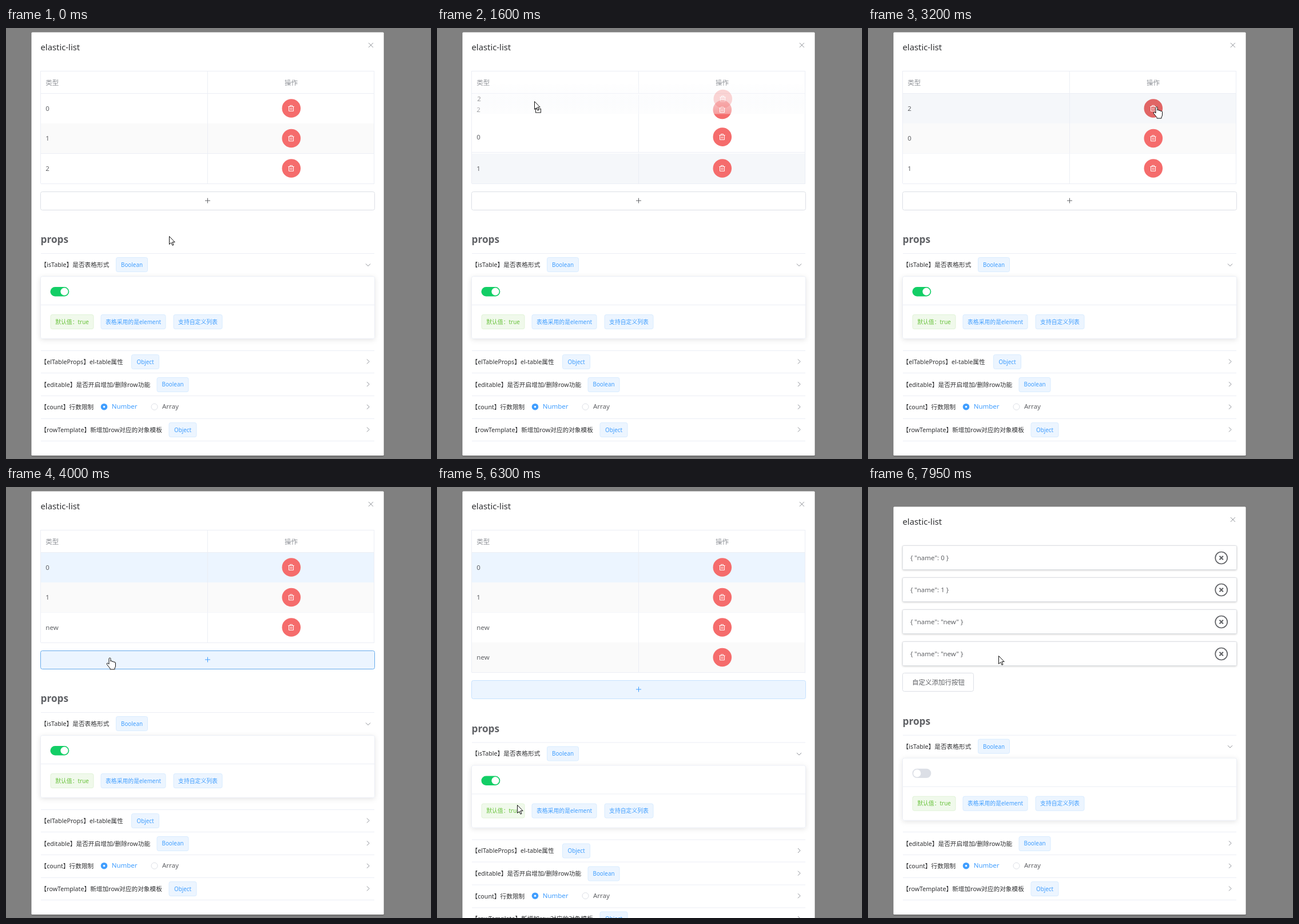
Recreate the animation shown at these times as an HTML page. Size 743x754 px, loop 8 s.

```html
<!DOCTYPE html>
<html lang="zh-CN">
<head>
<meta charset="utf-8">
<title>elastic-list</title>
<style>
html, body { margin: 0; width: 100%; height: 100%; overflow: hidden; background: #808080; }
svg { display: block; width: 743px; height: 754px; }
text { font-family: "Noto Sans", "Noto Sans CJK SC", "Noto Sans CJK", "Noto Sans CJK JP", sans-serif; white-space: pre; }
</style>
</head>
<body>
<svg viewBox="0 0 743 754">
  <defs>
    <filter id="dialogShadow" x="-5%" y="-5%" width="110%" height="110%">
      <feDropShadow dx="0" dy="1" stdDeviation="1.2" flood-opacity=".3"/>
    </filter>
    <filter id="cardShadow" x="-5%" y="-20%" width="110%" height="150%">
      <feDropShadow dx="0" dy="2" stdDeviation="4" flood-opacity=".1"/>
    </filter>
    <filter id="itemShadow" x="-5%" y="-20%" width="110%" height="150%">
      <feDropShadow dx="0" dy="1" stdDeviation="1.5" flood-opacity=".18"/>
    </filter>
    <linearGradient id="ghostFade" x1="0" y1="0" x2="0" y2="1">
      <stop offset="0" stop-color="#f9fafc" stop-opacity=".1"/>
      <stop offset=".6" stop-color="#f9fafc" stop-opacity=".6"/>
      <stop offset="1" stop-color="#f9fafc" stop-opacity=".35"/>
    </linearGradient>
  </defs>
  <g id="scene"></g>
</svg>
<script>
const LOOP = 8000, LEFT = 61, RIGHT = 644, COL = 353, ROW = 52.5, HEAD = 39.5;
const BLUE = '#409eff', LINE = '#ebeef5', TEXT = '#606266', HOVER = '#f5f7fa', PALE = '#ecf5ff';
const SWAP1 = 890, SWAP2 = 1488, SWAP_MS = 150;
const DRAG = 720, DROP = 1690, REMOVE = 3350, ADD1 = 3950, ADD2 = 4650, TOGGLE = 6800;
const GRAB = { x: 169, y: 249.5 };
const scene = document.getElementById('scene');

// time, x, y
const PATH = [
  [50, 285, 364], [650, 169, 250], [720, 169, 250], [850, 131, 204], [900, 130, 191],
  [950, 130, 183], [1450, 166, 143], [1600, 170, 128], [1850, 170, 128], [2950, 505, 138],
  [3450, 505, 138], [3900, 182, 299], [4050, 182, 299], [4250, 157, 304], [4400, 133, 317],
  [5350, 133, 317], [6150, 235, 479], [6300, 140, 556], [6600, 91, 506], [6850, 91, 506],
  [7300, 124, 447], [7450, 124, 447], [7950, 228, 295]
];

const clamp = v => Math.max(0, Math.min(1, v));
const mix = (a, b, p) => a + (b - a) * p;
const easeOut = v => 1 - Math.pow(1 - clamp(v), 2.2);
const between = (v, a, b) => v >= a && v < b;

function cursorAt(t) {
  const i = PATH.findIndex(k => k[0] > t);
  if (i === 0) return { x: PATH[0][1], y: PATH[0][2] };
  if (i < 0) return { x: PATH.at(-1)[1], y: PATH.at(-1)[2] };
  const a = PATH[i - 1], b = PATH[i], p = (t - a[0]) / (b[0] - a[0]);
  return { x: mix(a[1], b[1], p), y: mix(a[2], b[2], p) };
}

const rect = (x, y, w, h, fill, more = '') =>
  `<rect x="${x}" y="${y}" width="${w}" height="${h}" fill="${fill}" ${more}/>`;
const box = (x, y, w, h, fill, stroke, more = '') =>
  rect(x + .5, Math.round(y) + .5, w - 1, h - 1, fill, `stroke="${stroke}" ${more}`);
const circle = (x, y, r, fill, more = '') => `<circle cx="${x}" cy="${y}" r="${r}" fill="${fill}" ${more}/>`;
const hline = (y, x = LEFT, x2 = RIGHT) => rect(x, Math.floor(y), x2 - x, 1, LINE);
const vline = (x, y, h) => rect(x, y, 1, h, LINE);
const stroke = (d, color, w = 1) => `<path d="${d}" fill="none" stroke="${color}" stroke-width="${w}"/>`;
const at = (x, y, body, more = '') => `<g transform="translate(${x} ${y})" ${more}>${body}</g>`;
const text = (x, cy, s, size, fill = TEXT, more = '') =>
  `<text x="${x}" y="${cy + size * .36}" font-size="${size}" fill="${fill}" ${more}>${s}</text>`;
const middle = 'text-anchor="middle"';

function tag(x, cy, w, s, green) {
  const [bg, edge, ink] = green ? ['#f0f9eb', '#e1f3d8', '#67c23a'] : [PALE, '#d9ecff', BLUE];
  return box(x, cy - 13, w, 26, bg, edge, 'rx="3"') + text(x + w / 2, cy, s, 9.85, ink, middle);
}

function trash(y, fill = '#f56c6c') {
  return circle(498.8, y, 16.3, fill) + at(498.5, y, stroke(
    'M-5.2-3H5.2M-4-3V4.8H4V-3M-2-3V-5H2V-3M-1.3-.8V2.8M1.3-.8V2.8', '#fff'));
}

const rowCells = (y, label, button) => text(69.3, y + 26, label, 11.5) + trash(y + 26, button);

function rowsAt(t) {
  if (t < REMOVE) {
    const p1 = easeOut((t - SWAP1) / SWAP_MS), p2 = easeOut((t - SWAP2) / SWAP_MS);
    return [['2', 2 - p1 - p2], ['0', p2], ['1', 1 + p1]];
  }
  const labels = ['0', '1'];
  if (t >= ADD1) labels.push('new');
  if (t >= ADD2) labels.push('new');
  return labels.map((s, i) => [s, i]);
}

function rowFill(t, label, pos, hovered) {
  if (between(t, DRAG, DROP)) {
    if (label === (t < SWAP1 + SWAP_MS ? '2' : '1')) return HOVER;
    if (t >= SWAP2) return '#fff';
  } else {
    if (t >= REMOVE && pos === 0) return PALE;
    if (hovered) return HOVER;
  }
  if (label === '1' && t < SWAP1 + SWAP_MS) return '#fafafa';
  return Math.round(pos) % 2 ? '#fafafa' : '#fff';
}

function table(t, top, rows, c) {
  const first = top + HEAD, h = HEAD + rows.length * ROW, y0 = Math.floor(top);
  let out = text(69.3, top + 20.5, '类型', 11.5, '#909399', 'font-weight="500"') +
    text(498.5, top + 20.5, '操作', 11.5, '#909399', middle + ' font-weight="500"') +
    vline(COL - 1, top, HEAD);
  for (const [label, pos] of rows) {
    const y = first + pos * ROW;
    const hovered = between(c.y, y, y + ROW) && between(c.x, LEFT, RIGHT);
    const onTrash = Math.hypot(c.x - 498.8, c.y - y - 26) < 16 && hovered;
    const button = onTrash ? (t > 3150 && t < REMOVE ? '#e16565' : '#f78989') : '#f56c6c';
    if (onTrash) c.hand = true;
    out += rect(LEFT, y, RIGHT - LEFT, ROW, rowFill(t, label, pos, hovered)) +
      vline(COL - 1, y, ROW) + hline(y + ROW) + rowCells(y, label, button);
  }
  return out + hline(first) + hline(top) + hline(top + h) +
    vline(LEFT - 1, y0, h) + vline(RIGHT - 1, y0, h + 1);
}

function addButton(t, y, c) {
  const over = between(c.y, y, y + 32) && between(c.x, LEFT, RIGHT) && !between(t, DRAG, DROP);
  if (over) c.hand = true;
  const lit = over || t >= ADD1;
  let edge = lit ? '#c6e2ff' : '#dcdfe6';
  if (between(t, 3850, ADD1) || between(t, 4550, ADD2)) edge = '#3a8ee6';
  else if (between(t, ADD1, ADD1 + 100)) edge = '#66aaeb';
  return box(LEFT - .5 + .5 - 1, y, 585, 33, lit ? PALE : '#fff', edge, 'rx="3"') +
    at(352.5, Math.round(y) + 16, stroke('M-4.5 0H4.5M0-4.5V4.5', lit ? BLUE : TEXT));
}

function customList(top) {
  let out = '';
  ['0', '1', '"new"', '"new"'].forEach((v, i) => {
    const y = top + i * 56;
    out += box(LEFT - 1, y, 585, 43, '#fff', '#dcdfe3', 'rx="2" filter="url(#itemShadow)"') +
      text(74, y + 21.7, `{ "name": ${v} }`, 11.5) +
      circle(617.7, y + 22, 10.5, 'none', `stroke="${TEXT}" stroke-width="1.7"`) +
      at(617.7, y + 22, stroke('M-3.2-3.2L3.2 3.2M3.2-3.2L-3.2 3.2', TEXT, 2));
  });
  return out + box(LEFT - 1, top + 223, 125, 33, '#fff', '#dcdfe6', 'rx="3"') +
    text(123, top + 239.5, '自定义添加行按钮', 11.5, TEXT, middle);
}

function toggle(p) {
  const fill = `rgb(${mix(19, 220, p)},${mix(206, 223, p)},${mix(102, 230, p)})`;
  return rect(77.5, 453, 32.8, 16.4, fill, 'rx="8.2"') + circle(mix(102, 85.8, p), 461.2, 6.6, '#fff');
}

const chevron = (y, turn = 0) =>
  `<g transform="translate(633 ${y}) rotate(${turn})">${stroke('M-2-4L2 0L-2 4', '#8b8e95')}</g>`;
const item = (y, label, body) =>
  hline(y) + text(60.5, y + 20, label, 10.7, '#303133') + body + chevron(y + 19.5);

function propsHead(off) {
  return text(60.5, 369.8, 'props', 17.25, TEXT, 'font-weight="700"') + hline(394) +
    text(60.5, 414, '【isTable】是否表格形式', 10.7, '#303133') +
    tag(192, 414.3, 56, 'Boolean') + chevron(414.5, 90) +
    box(LEFT - 1, 434, 585, 110, '#fff', LINE, 'rx="3" filter="url(#cardShadow)"') +
    hline(484) + toggle(off) +
    tag(77.5, 514, 76, '默认值：true', true) + tag(165.5, 514, 114, '表格采用的是element') +
    tag(292.5, 514, 86, '支持自定义列表');
}

function propsItems(listMode) {
  const radios = circle(171.5, 662.7, 5.8, BLUE) + circle(171.5, 662.7, 1.8, '#fff') +
    text(184.7, 662.3, 'Number', 11.5, BLUE) +
    circle(259.5, 662.7, 5.5, '#fff', 'stroke="#dcdfe6"') + text(273, 662.3, 'Array', 11.5);
  return (listMode ? '' : item(564, '【elTableProps】el-table属性', tag(219, 584, 49, 'Object'))) +
    item(603.7, '【editable】是否开启增加/删除row功能', tag(263.5, 623.7, 56, 'Boolean')) +
    item(643.3, '【count】行数限制', radios) +
    item(683, '【rowTemplate】新增加row对应的对象模板', tag(284.5, 703, 49, 'Object')) + hline(722.5);
}

function ghostRow(c) {
  return at(c.x - GRAB.x, c.y - GRAB.y,
    rect(LEFT, 219.5, RIGHT - LEFT, ROW, 'url(#ghostFade)') +
    text(69.3, 245.5, '2', 11.5, TEXT, 'opacity=".65"') +
    `<g opacity=".28">${trash(245.5)}</g>`);
}

function pointer(c, dragging) {
  const arrow = 'M.5.5V14.5L3.8 11.4L6 16.3L8 15.4L5.9 10.6H10.2Z';
  const hand = 'M-2 11V1.5Q-2 0-.5 0T1 1.5V6Q1 5 2.5 5.2T4 7Q4 6 5.5 6.2T7 8Q7 7 8.3 7.3T9.5 9V14' +
    'Q9.5 16 8 18V20H0V18.5L-5.5 11.5Q-6.5 9-4.5 9Q-3 9.5-2 11Z';
  const badge = dragging ? rect(2.5, 13.5, 9, 6.5, '#fff', 'stroke="#222"') : '';
  return at(Math.round(c.x), Math.round(c.y), badge +
    `<path d="${c.hand ? hand : arrow}" fill="#fff" stroke="#111" stroke-linejoin="round"/>`);
}

function render(t) {
  const c = cursorAt(t), listMode = t >= TOGGLE, dragging = between(t, DRAG, DROP);
  const rows = rowsAt(t);
  const top = listMode ? 34 : rows.length === 2 ? 59.5 : 7;
  const low = !listMode && rows.length === 4 ? ROW : 0;
  const headShift = listMode ? 39.7 : low;
  const body = top + 68;
  if (between(c.x, 77, 110) && between(c.y - headShift, 453, 470)) c.hand = true;

  let out = rect(44.5, top + .5, 616, 747.5 + low - top, '#fff', 'rx="1.6" filter="url(#dialogShadow)"') +
    text(60.5, top + 26.3, 'elastic-list', 14.8, '#303133') +
    at(637.8, top + 23, stroke('M-4-4L4 4M4-4L-4 4', '#909399'));
  out += listMode ? customList(body)
    : table(t, body, rows, c) + addButton(t, body + HEAD + rows.length * ROW + 13.9, c);
  out += at(0, headShift, propsHead(clamp((t - TOGGLE) / 250))) + at(0, low, propsItems(listMode));
  if (dragging) out += ghostRow(c);
  scene.innerHTML = out + pointer(c, dragging);
}

const start = performance.now();
function tick(now) {
  render(Math.max(0, now - start) % LOOP);
  requestAnimationFrame(tick);
}
render(0);
requestAnimationFrame(tick);
</script>
</body>
</html>
```
